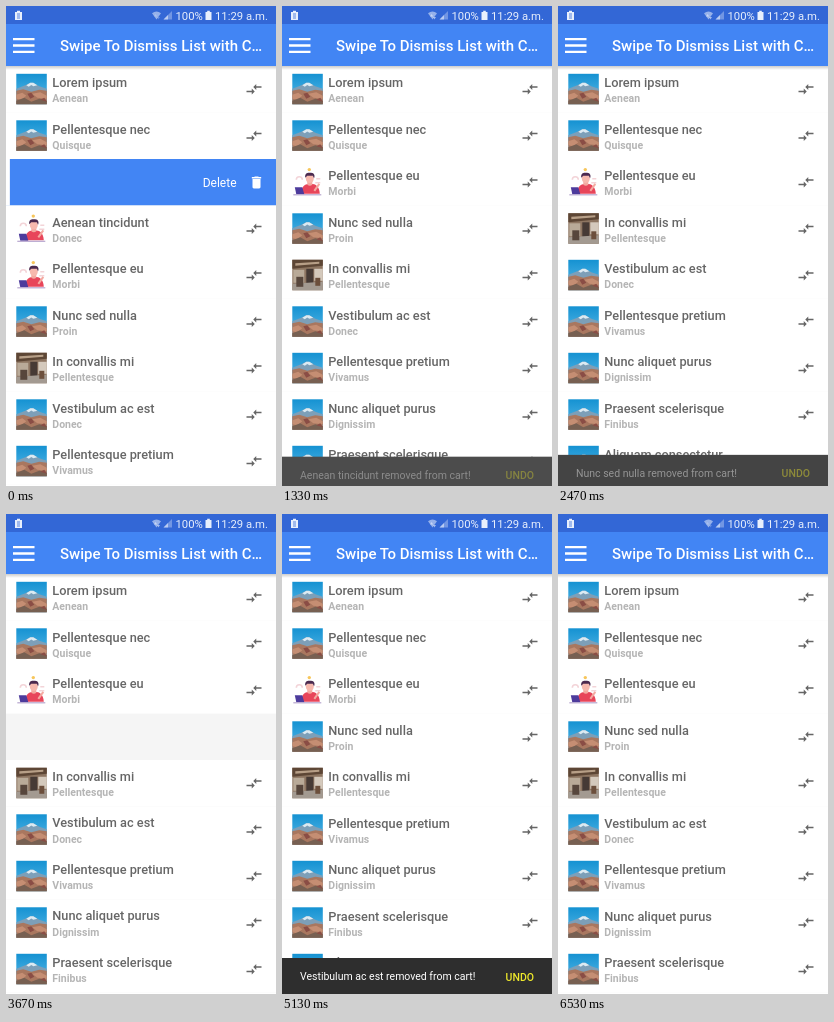
An HTML page that plays this animation: 270x480 px, repeating every 6590 ms.

```html
<!DOCTYPE html>
<html lang="en">
<head>
<meta charset="utf-8">
<title>Swipe to dismiss list</title>
<style>
html, body { margin: 0; width: 100%; height: 100%; overflow: hidden; background: #f5f5f5; }
svg { display: block; width: 270px; height: 480px; font-family: Roboto, sans-serif; }
</style>
</head>
<body>
<svg id="stage" viewBox="0 0 270 480" xmlns="http://www.w3.org/2000/svg">
  <defs>
    <linearGradient id="sky" x1="0" y1="0" x2="0" y2="1">
      <stop offset="0" stop-color="#1592d2"/><stop offset="1" stop-color="#5dbbe8"/>
    </linearGradient>
    <linearGradient id="shade" x1="0" y1="0" x2="0" y2="1">
      <stop offset="0" stop-color="#000" stop-opacity=".2"/><stop offset="1" stop-color="#000" stop-opacity="0"/>
    </linearGradient>
    <g id="hill">
      <rect width="30.5" height="30.5" fill="url(#sky)"/>
      <path d="M0 15 L9 11.5 L14 9 L17 9 L23 12.5 L30.5 15 V20 H0Z" fill="#7d9fb8"/>
      <path d="M10 11.5 L14 9 L17 9 L21 11.5 L17 12.5 L15 11.3 L12.5 13Z" fill="#dceaf2"/>
      <path d="M0 17 L7 15.5 L15 18 L23 16 L30.5 17 V30.5 H0Z" fill="#a9775f"/>
      <path d="M0 21 L6 19 L10 22 L5 26 L0 25Z M16 20 L24 18.5 L30.5 22 V25 L21 24Z" fill="#c58e73"/>
      <path d="M0 27 L8 24 L15 28 L23 25 L30.5 27 V30.5 H0Z" fill="#776052"/>
      <path d="M11 20 L15 19 L18 23 L14 25Z M24 26 L28 24 L30.5 28Z" fill="#8a4d45"/>
    </g>
    <g id="desk">
      <rect width="30.5" height="30.5" fill="#fff"/>
      <circle cx="17" cy="2.8" r="1.7" fill="#f7c65b"/>
      <path d="M4 13 a3 3 0 0 1 6 0 M24 12 h4 M23 16 h5" stroke="#f3d4d8" stroke-width="1.6" fill="none"/>
      <path d="M9 27 C9 19 13 17 18 17 C24 17 27 20 27.5 27Z" fill="#e8455a"/>
      <path d="M15 14 h5 v4 q-2.5 2 -5 0Z" fill="#f4a9a0"/>
      <ellipse cx="17.5" cy="11.8" rx="4" ry="4.5" fill="#f7b9ae"/>
      <path d="M13 11 C12 6 16 5.5 18 6 C22 5.5 23 9 21.7 11.5 L20.5 9 L15 9Z" fill="#4b2a4f"/>
      <path d="M22 24 L27 17" stroke="#f4a9a0" stroke-width="2"/>
      <path d="M2.5 20.5 H10 L12 27.5 H4Z" fill="#4d3b9c"/>
      <path d="M1 28 H29" stroke="#b6a5ce" stroke-width="1.2"/>
    </g>
    <g id="shop">
      <rect width="30.5" height="30.5" fill="#8d7561"/>
      <path d="M0 0 H30.5 V6 L0 9Z" fill="#5d4635"/>
      <path d="M3 3.5 L27 2 V4 L3 6Z" fill="#b79f87"/>
      <rect x="1" y="10" width="11" height="13" fill="#b9aa98"/>
      <rect x="14" y="9" width="7" height="15" fill="#463a35"/>
      <rect x="22" y="9" width="8.5" height="12" fill="#d4c9bc"/>
      <path d="M0 24 L30.5 22 V30.5 H0Z" fill="#a39a91"/>
      <rect x="4" y="17" width="7" height="10" fill="#57463c"/>
      <rect x="23" y="18" width="5" height="8" fill="#6c4f3c"/>
    </g>
    <path id="swap" d="M9 14H2v2h7v3l4-4-4-4zM15 13v-3h7V8h-7V5l-4 4z" transform="scale(.75)" fill="#666"/>
    <path id="bin" d="M6 19c0 1.1.9 2 2 2h8c1.1 0 2-.9 2-2V7H6zM19 4h-3.5l-1-1h-5l-1 1H5v2h14z" transform="scale(.667)" fill="#fff"/>
  </defs>

  <rect width="270" height="480" fill="#f5f5f5"/>
  <g id="list"></g>

  <g id="snack">
    <rect id="bar" width="270" height="37"/>
    <g id="snackText" font-size="10.5">
      <text id="msg" x="18" y="22.4" fill="#fff"></text>
      <circle id="ripple" cx="238" cy="18.5" r="17" fill="#fff"/>
      <text x="223.6" y="22.6" fill="#eee82c" font-weight="500">UNDO</text>
    </g>
  </g>

  <g id="header">
    <rect y="60" width="270" height="4" fill="url(#shade)"/>
    <rect width="270" height="60" fill="#4285f4"/>
    <rect width="270" height="18" fill="#3367d6"/>
    <path d="M7 33.2 H28.5 M7 39.5 H28.5 M7 45.8 H28.5" stroke="#fff" stroke-width="2.3"/>
    <text x="54" y="45" font-size="15" font-weight="500" fill="#fff">Swipe To Dismiss List with C…</text>
    <g fill="#e8effc">
      <path d="M9 6 h2 v-1.3 h3 V6 h2 v8 H9Z"/>
      <path d="M11 8 h3 M11 10 h3 M11 12 h3" stroke="#3367d6" stroke-width=".8"/>
      <path d="M146 7.3 Q150.5 3.6 155 7.3 L150.5 13.6Z" opacity=".55"/>
      <path id="wifiMark" d="M148 10.5 l1.6 -2.5 l1.6 2.5Z M151 11 h3 l-1.5 2.6Z"/>
      <path d="M157.5 13.5 L166 5 V13.5Z" opacity=".35"/>
      <path d="M157.5 13.5 L162 9 V13.5Z" opacity=".6"/>
      <path d="M199.5 6 h1.7 V4.8 h2.6 V6 h1.7 v8 h-6Z"/>
      <text x="169.5" y="13.7" font-size="11.3">100%</text>
      <text x="209" y="13.7" font-size="11.3">11:29 a.m.</text>
    </g>
  </g>

  <g id="finger">
    <circle r="8" fill="#d3d6e2" fill-opacity=".5" stroke="#aab0c4" stroke-opacity=".5"/>
    <circle r="4.5" fill="#fff" fill-opacity=".25"/>
  </g>
</svg>
<script>
const LOOP = 6590, STEP = 200 / 3, ROW = 46.5, TOP = 60, WIDTH = 270;
const MOVE = 250, FADE = 120;
const $ = id => document.getElementById(id);

// drag and release time the swipe; removed and restored time the list change
const items = [
  { name: "Lorem ipsum", sub: "Aenean" },
  { name: "Pellentesque nec", sub: "Quisque" },
  { name: "Duis id mauris", sub: "Mauris", drag: -600, release: -220, dist: 160, removed: 30 },
  { name: "Aenean tincidunt", sub: "Donec", pic: "desk", drag: 600, release: 700, dist: 138, removed: 950 },
  { name: "Pellentesque eu", sub: "Morbi", pic: "desk" },
  { name: "Nunc sed nulla", sub: "Proin", drag: 1540, release: 1820, dist: 189, removed: 2070, restored: 3420 },
  { name: "In convallis mi", sub: "Pellentesque", pic: "shop" },
  { name: "Vestibulum ac est", sub: "Donec", drag: 4220, release: 4510, dist: 170, removed: 4760, restored: 5900 },
  { name: "Pellentesque pretium", sub: "Vivamus" },
  { name: "Nunc aliquet purus", sub: "Dignissim" },
  { name: "Praesent scelerisque", sub: "Finibus" },
  { name: "Aliquam consectetur", sub: "Vivamus" }
];

const snacks = [
  { item: 2, from: 30, to: 950 },
  { item: 3, from: 1200, to: 2070 },
  { item: 5, from: 2320, to: 3420 },
  { item: 7, from: 4760, to: 5900 }
];

const touches = [
  { from: 600, move: 600, rest: 700, to: 910, x0: 221, x1: 83, y: 178 },
  { from: 1500, move: 1540, rest: 1820, to: 1910, x0: 263, x1: 74, y: 231 },
  { from: 3070, to: 3400, x0: 238, x1: 238, y: 464, tap: true },
  { from: 4200, move: 4220, rest: 4510, to: 4600, x0: 250, x1: 80, y: 322 },
  { from: 5660, to: 5880, x0: 238, x1: 238, y: 464, tap: true }
];

const clamp = v => Math.max(0, Math.min(1, v));
const span = (t, start, length) => clamp((t - start) / length);
const mix = (a, b, p) => a + (b - a) * p;
const smooth = p => .5 - .5 * Math.cos(Math.PI * p);

// cubic-bezier(.4, 0, .2, 1)
function glide(x) {
  let lo = 0, hi = 1, s = .5;
  for (let i = 0; i < 20; i++) {
    s = (lo + hi) / 2;
    const v = 1.2 * (1 - s) ** 2 * s + .6 * (1 - s) * s * s + s ** 3;
    if (v < x) lo = s; else hi = s;
  }
  return 3 * (1 - s) * s * s + s ** 3;
}

function buildRow(item) {
  const g = document.createElementNS("http://www.w3.org/2000/svg", "g");
  g.innerHTML = `
    <g>
      <rect width="270" height="46.5" fill="#4285f4"/>
      <text x="196.7" y="27.8" font-size="12" fill="#fff">Delete</text>
      <use href="#bin" x="242.5" y="15.4"/>
    </g>
    <g>
      <rect width="270" height="46.6" fill="#fff"/>
      <use href="#${item.pic || "hill"}" x="10.3" y="7.8"/>
      <text x="46.3" y="21" font-size="12.75" font-weight="500" fill="#666">${item.name}</text>
      <text x="46.3" y="36.2" font-size="10.5" font-weight="700" fill="#b5b5b5">${item.sub}</text>
      <use href="#swap" x="239" y="14.3"/>
    </g>`;
  $("list").append(g);
  item.row = g;
  [item.under, item.card] = g.children;
}

function rowState(item, t) {
  const { drag, release, dist, removed, restored } = item;
  if (removed === undefined || t < drag) return { size: 1, shift: 0, alpha: 1 };
  if (t < restored + MOVE + FADE && t >= restored)
    return { size: smooth(span(t, restored, MOVE)), shift: 0, alpha: span(t, restored + MOVE, FADE) };
  if (t >= restored) return { size: 1, shift: 0, alpha: 1 };
  const pulled = dist * smooth(span(t, drag, release - drag));
  const shift = mix(pulled, WIDTH, smooth(span(t, release, removed - release)));
  const gone = removed + FADE;
  return { size: 1 - smooth(span(t, gone, MOVE)), shift, alpha: t < gone ? 1 : 0 };
}

function drawList(t) {
  let y = TOP;
  for (const item of items) {
    const s = rowState(item, t);
    item.row.setAttribute("transform", `translate(0 ${y})`);
    item.row.setAttribute("opacity", s.alpha);
    item.under.setAttribute("visibility", s.shift > 0 ? "visible" : "hidden");
    item.card.setAttribute("transform", `translate(${-s.shift} 0)`);
    y += ROW * s.size;
  }
}

function drawSnack(t) {
  const s = snacks.find(k => t >= k.from && t < k.to + MOVE);
  $("snack").setAttribute("visibility", s ? "visible" : "hidden");
  if (!s) return;
  const leaving = t >= s.to;
  const shown = leaving ? 1 - glide(span(t, s.to, MOVE)) : glide(span(t, s.from, MOVE));
  const alpha = leaving ? 1 - span(t, s.to, 180) : span(t, s.from + 70, 180);
  const grey = Math.round(mix(210, 46, shown));
  $("snack").setAttribute("transform", `translate(0 ${480 - 36 * shown})`);
  $("bar").setAttribute("fill", `rgb(${grey},${grey},${grey})`);
  $("snackText").setAttribute("opacity", alpha);
  $("msg").textContent = items[s.item].name + " removed from cart!";
}

function drawTouch(t) {
  const k = touches.find(k => t >= k.from && t < k.to);
  $("finger").setAttribute("visibility", k ? "visible" : "hidden");
  $("ripple").setAttribute("opacity", k && k.tap ? .12 * span(t, k.from, 150) : 0);
  if (!k) return;
  const x = k.tap ? k.x0 : mix(k.x0, k.x1, smooth(span(t, k.move, k.rest - k.move)));
  $("finger").setAttribute("transform", `translate(${x} ${k.y})`);
}

function draw(time) {
  const t = Math.floor((time % LOOP + 4) / STEP) * STEP;
  drawList(t);
  drawSnack(t);
  drawTouch(t);
  $("wifiMark").setAttribute("opacity", t < 60 || t > 6520 ? .25 : .6);
}

items.forEach(buildRow);
const start = performance.now();
function tick() {
  draw(performance.now() - start);
  requestAnimationFrame(tick);
}
tick();
</script>
</body>
</html>
```
